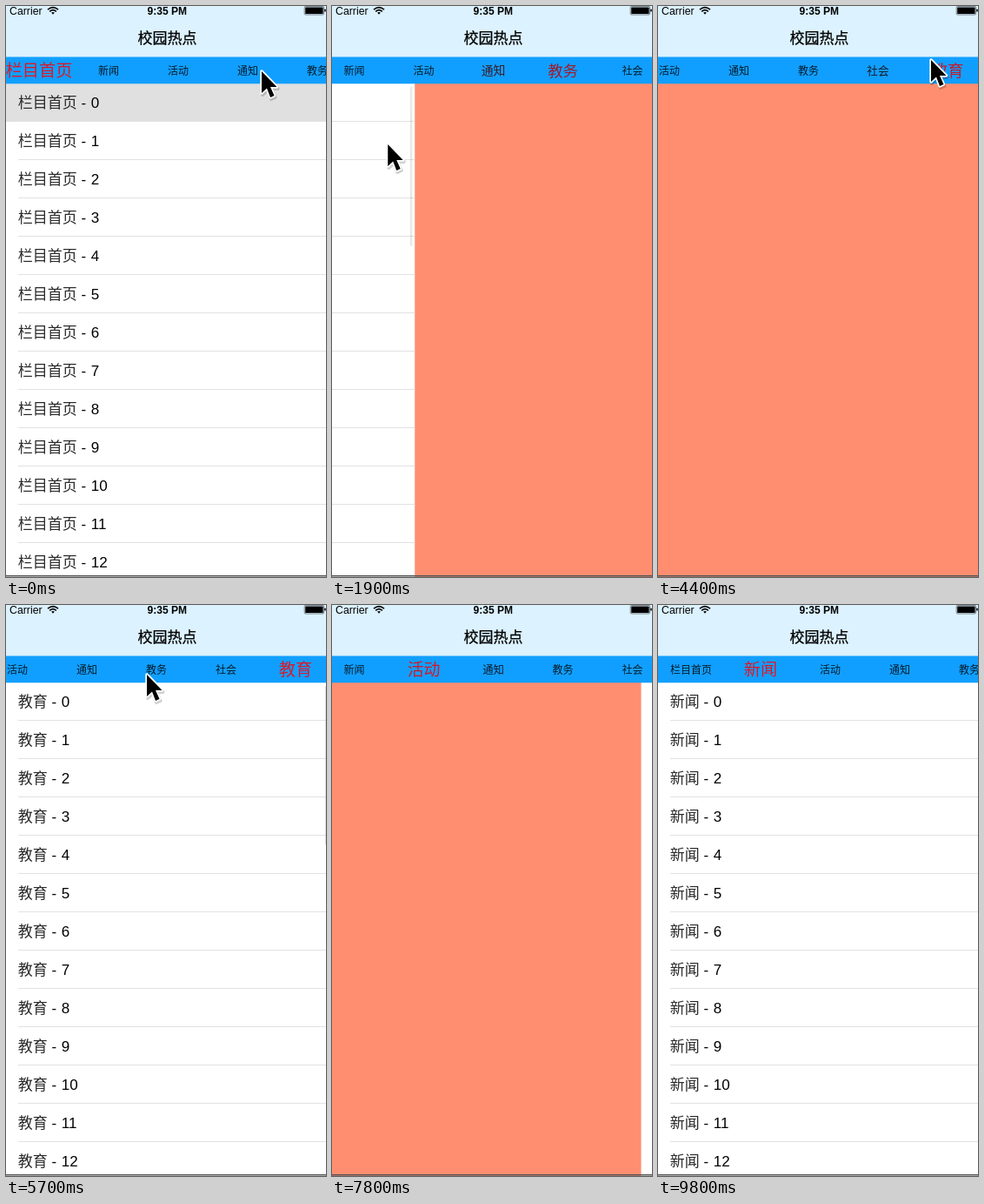
Recreate the animation shown at these times as an HTML page. Size 368 by 656 pixels, loop 9.9 s.

```html
<!DOCTYPE html>
<html lang="zh-CN">
<head>
<meta charset="utf-8">
<style>
html, body { margin: 0; width: 100%; height: 100%; overflow: hidden; background: #fff; }
svg { display: block; width: 368px; height: 656px; overflow: hidden; }
text { font-family: "Liberation Sans", "Noto Sans CJK SC", "Noto Sans CJK", sans-serif; fill: #000; }
.row { font-size: 17px; font-weight: 300; fill: #2a2a2a; }
.row tspan { fill: #000; }
.tab { font-size: 12px; font-weight: 300; text-anchor: middle; fill-opacity: .84; }
</style>
</head>
<body>
<svg viewBox="0 0 368 656">
  <rect y="89" width="368" height="567" fill="#ff8e70"/>
  <g id="pages"></g>
  <rect y="654" width="368" height="1.5" fill="#555"/>
  <rect width="368" height="59" fill="#dcf2ff"/>
  <text x="4" y="9.5" font-size="12.3">Carrier</text>
  <g fill="none" stroke="#000" stroke-width="1.7">
    <path d="M48 4.2Q54 -1 60 4.2M50.2 6.4Q54 3 57.8 6.4"/>
    <path d="M54 9.8L52.1 7.6Q54 6.2 55.9 7.6Z" fill="#000" stroke="none"/>
  </g>
  <text x="185.3" y="9.5" font-size="12" font-weight="bold" text-anchor="middle">9:35 PM</text>
  <rect x="343.2" y="0.4" width="22.4" height="9.6" rx="1.4" fill="none" stroke="#000" stroke-width=".5"/>
  <rect x="344.2" y="1.4" width="20.4" height="7.6" rx=".6"/>
  <rect x="366.3" y="3.6" width="1.4" height="3.2" rx=".7"/>
  <text x="185.5" y="43" font-size="17" text-anchor="middle" stroke="#000" stroke-width=".25">校园热点</text>
  <rect y="58.5" width="368" height="30.8" fill="#119fff"/>
  <g id="tabs"></g>
  <g id="cursor" stroke-linejoin="round">
    <path d="M1 2V27L7 21.5L11 32L15.5 30L11 20H18.5Z" stroke="#000" stroke-width="4" opacity=".18"/>
    <path d="M0 0V25L6 19.5L10 30L14.5 28L10 18H17.5Z" stroke="#fff" stroke-width="3.4" paint-order="stroke"/>
  </g>
</svg>
<script>
const LOOP = 9900, STEP = 100, PAGE_W = 375, TAB_W = 80, LEFT = -2, ROW_H = 44;
const GLIDE = 345, CENTRING = 300, BAR_LIFE = 1400, BAR_FADE = 150;
const names = ['栏目首页', '新闻', '活动', '通知', '教务', '社会', '教育'];
const maxOffset = names.length * TAB_W - PAGE_W;

const $ = id => document.getElementById(id);
const clamp = (v, lo = 0, hi = 1) => Math.max(lo, Math.min(hi, v));
const mix = (a, b, u) => a + (b - a) * u;
const ease = u => (u = clamp(u)) * u * (3 - 2 * u);

// Each gesture starts at a point; a swipe carries the pointer along with the page.
const tap = (at, page, x, y) => ({ at, page, x, y, dx: 0, length: GLIDE });
const swipe = (at, page, x, y, dir, length = GLIDE) => ({ at, page, x, y, dx: dir * PAGE_W, length });
const pan = { at: 2600, x: 262, y: 72, dx: -150, length: 400 };
const gestures = [
  tap(200, 3, 294, 75),
  swipe(1500, 4, 342, 159, -1, 600),
  pan,
  tap(4100, 6, 314, 62),
  tap(5700, 4, 162, 80),
  swipe(6500, 3, 64, 200, 1),
  swipe(7500, 2, 64, 200, 1),
  swipe(8050, 1, 64, 200, 1)
];
const end = g => g.at + g.length;

const turns = gestures.filter(g => g.page !== undefined);
const pageMoves = turns.map(g => ({ at: g.at, length: g.length, to: g.page }));

// The tab strip centres the new tab after landing; panning overshoots and springs back.
const tabMoves = turns.map(g => ({
  at: end(g), length: CENTRING, to: clamp((g.page + 0.5) * TAB_W - PAGE_W / 2, 0, maxOffset)
})).concat(
  { at: pan.at, length: pan.length, to: maxOffset + 30 },
  { at: end(pan) + 300, length: 500, to: maxOffset }
).sort((a, b) => a.at - b.at);

const loadedAt = names.map((_, i) => {
  const first = turns.find(g => g.page === i);
  return first ? end(first) : i ? Infinity : -BAR_LIFE;
});

const follow = (moves, t) => moves.reduce((v, m) => mix(v, m.to, ease((t - m.at) / m.length)), 0);

// Between gestures the pointer travels during the first part of the pause.
function pointer(t) {
  const i = gestures.findLastIndex(g => g.at <= t);
  const next = gestures[i + 1];
  if (i < 0) return next;
  const g = gestures[i];
  const x = g.x + g.dx * ease((t - g.at) / g.length);
  if (!next) return { x, y: g.y };
  const u = ease((t - end(g)) / (0.6 * (next.at - end(g))));
  return { x: mix(x, next.x, u), y: mix(g.y, next.y, u) };
}

function add(parent, tag, attrs, text = '') {
  const el = document.createElementNS('http://www.w3.org/2000/svg', tag);
  for (const k in attrs) el.setAttribute(k, attrs[k]);
  el.textContent = text;
  return parent.appendChild(el);
}

const pages = names.map((name, i) => {
  const g = add($('pages'), 'g', {});
  add(g, 'rect', { y: 89, width: PAGE_W, height: 567, fill: '#fff' });
  if (i === 0) add(g, 'rect', { y: 89, width: PAGE_W, height: ROW_H, fill: '#e0e0e0' });
  for (let r = 0; r < 13; r++) {
    const y = 89 + r * ROW_H;
    const label = add(g, 'text', { x: 15.7, y: y + 28, class: 'row' }, name);
    add(label, 'tspan', {}, ' - ');
    add(label, 'tspan', { dx: 1 }, r);
    add(g, 'rect', { x: 16, y: y + 43, width: PAGE_W - 16, height: 1, fill: '#e2e2e2' });
  }
  const bar = add(g, 'rect', { x: PAGE_W - 5.5, y: 92.5, width: 2.5, height: 183.5, rx: 1.25 });
  return { g, bar };
});

const tabs = names.map(name => add($('tabs'), 'text', { class: 'tab', y: 4.5 }, name));

function draw(t) {
  const page = follow(pageMoves, t), offset = follow(tabMoves, t);
  pages.forEach(({ g, bar }, i) => {
    const age = t - loadedAt[i];
    g.setAttribute('display', age >= 0 && Math.abs(i - page) < 1 ? 'inline' : 'none');
    g.setAttribute('transform', `translate(${LEFT + (i - page) * PAGE_W})`);
    bar.setAttribute('opacity', 0.3 * clamp((BAR_LIFE - age) / BAR_FADE));
  });
  tabs.forEach((tab, i) => {
    const focus = clamp(1 - Math.abs(i - page));
    const x = LEFT + (i + 0.5) * TAB_W - offset;
    tab.setAttribute('transform', `translate(${x} 74) scale(${1 + 0.6 * focus})`);
    tab.style.fill = `rgb(${Math.round(255 * focus)},0,0)`;
  });
  const { x, y } = pointer(t);
  $('cursor').setAttribute('transform', `translate(${x} ${y})`);
}

const start = performance.now();
function tick() {
  const t = (performance.now() - start) % LOOP;
  draw(Math.floor(t / STEP) * STEP);
  requestAnimationFrame(tick);
}
tick();
</script>
</body>
</html>
```
